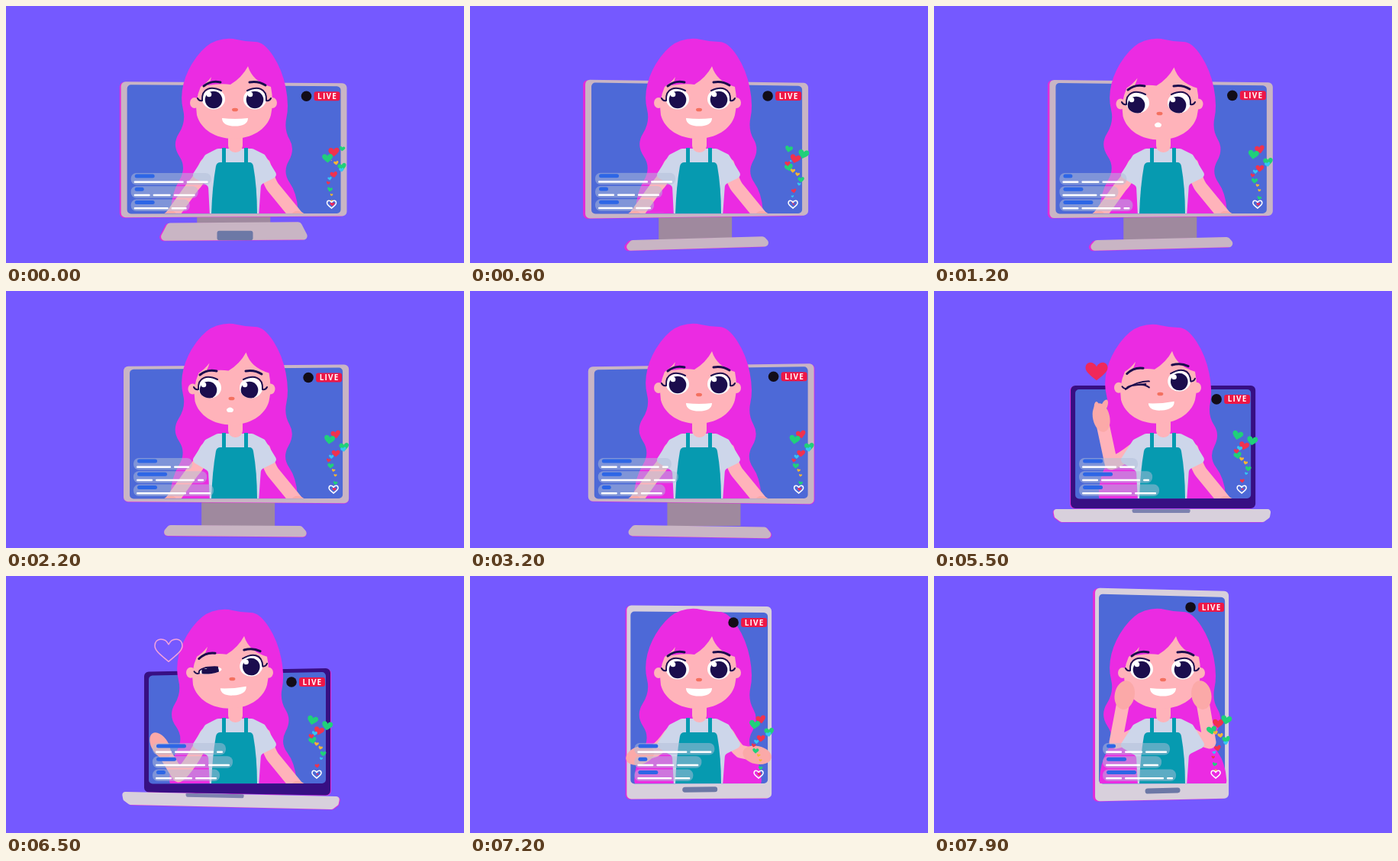
An HTML page with a canvas for the animation above (8 s loop, 600 by 337 pixels).

```html
<!DOCTYPE html>
<html lang="en">
<head>
<meta charset="utf-8">
<title>Live stream</title>
<style>
html, body { margin: 0; width: 100%; height: 100%; overflow: hidden; background: #7559ff; }
canvas { display: block; }
</style>
</head>
<body>
<canvas id="stage" width="600" height="337"></canvas>
<script>
const ctx = document.getElementById('stage').getContext('2d');
const LOOP = 8000, TURN = 3650, FLOOR = 272;
const BG = '#7559ff', SCREEN = '#4d69d7', HAIR = '#eb2be2', SKIN = '#ffb3ba', HAND = '#fba9a8', INK = '#1b0d4d',
  TEAL = '#069ab0', SHIRT = '#cdd6ea', RED = '#f0285a', GREY = '#c9b5c4', PALE = '#d8d0dc', SHADE = '#e22bd8';

const DEVICES = [
  { name: 'monitor', color: GREY, l: 153, r: 447, t: 98, b: 277, side: 8, top: 4 },
  { name: 'laptop', color: '#370f83', l: 179, r: 421, t: 124, b: 285, side: 6, top: 5 },
  { name: 'tablet', color: PALE, l: 213, r: 390, t: 17, b: 294, side: 5, top: 8 }];
const MESSAGES = [
  { width: 105, name: 26, gaps: [69] }, { width: 88, name: 12, gaps: [25, 52] },
  { width: 77, name: 26, gaps: [49] }, { width: 96, name: 39, gaps: [25, 80] }];
const LIKE_COLORS = ['#f0324e', '#20d07a', '#20d07a', '#35c5f4', '#f7b733', '#35c5f4', '#f0324e', '#f7b733'];

const mix = (a, b, k) => a + (b - a) * k;
const clamp = k => Math.max(0, Math.min(1, k));
const ease = k => k * k * (3 - 2 * k);
const ramp = (t, start, time = 350) => ease(clamp((t - start) / time));
const pulse = (t, on, off, time) => ramp(t, on, time) - ramp(t, off, time);
const overshoot = k => 1 + 1.9 * (k - 1) ** 3 + .9 * (k - 1) ** 2;

function fill(color) { ctx.fillStyle = color; ctx.fill(); }
function stroke(color, width) {
  ctx.strokeStyle = color; ctx.lineWidth = width;
  ctx.lineCap = ctx.lineJoin = 'round'; ctx.stroke();
}
function oval(x, y, rx, ry, color, turn = 0) {
  ctx.beginPath(); ctx.ellipse(x, y, rx, ry, turn, 0, 7); fill(color);
}
function box(x, y, w, h, r, color) {
  ctx.beginPath(); ctx.roundRect(x, y, w, h, r); fill(color);
}
function shape(path, color) { ctx.fillStyle = color; ctx.fill(new Path2D(path)); }

// Polygon with rounded corners.
function poly(points, r, color) {
  const n = points.length, last = points[n - 1];
  ctx.beginPath();
  ctx.moveTo((last[0] + points[0][0]) / 2, (last[1] + points[0][1]) / 2);
  points.forEach((p, i) => ctx.arcTo(...p, ...points[(i + 1) % n], r));
  ctx.closePath(); fill(color);
}
// Closed soft curve through the midpoints.
function soft(points, color) {
  const n = points.length;
  ctx.beginPath();
  for (let i = 0; i <= n; i++) {
    const [x, y] = points[i % n], [u, v] = points[(i + 1) % n];
    if (i) ctx.quadraticCurveTo(x, y, (x + u) / 2, (y + v) / 2);
    else ctx.moveTo((x + u) / 2, (y + v) / 2);
  }
  fill(color);
}
function edged(points, r, color, shift) {
  poly(points.map(([x, y]) => [x + shift, y + .5]), r, SHADE);
  poly(points, r, color);
}
function heartPath(x, y, s, turn = 0) {
  ctx.save();
  ctx.translate(x, y); ctx.rotate(turn); ctx.scale(s, s);
  ctx.beginPath();
  ctx.moveTo(0, .85);
  ctx.bezierCurveTo(-.45, .45, -1, .1, -1, -.3);
  ctx.bezierCurveTo(-1, -.9, -.25, -.95, 0, -.4);
  ctx.bezierCurveTo(.25, -.95, 1, -.9, 1, -.3);
  ctx.bezierCurveTo(1, .1, .45, .45, 0, .85);
  ctx.closePath();
  ctx.restore();
}

// The device takes turns, springs from the last one's size and slowly swings round.
function deviceAt(t) {
  const turn = Math.floor((t + 200) / TURN), age = t + 200 - turn * TURN;
  const now = DEVICES[turn % 3], last = DEVICES[(turn + 2) % 3];
  const k = overshoot(clamp(age / 330));
  const yaw = -Math.cos(Math.PI * (age - 950) / 2150);
  const l = mix(last.l, now.l, k) + 2 * yaw, r = mix(last.r, now.r, k) + 4 * yaw;
  const top = mix(last.t, now.t, k), bottom = mix(last.b, now.b, k);
  const d = { ...now, age, yaw, shift: 2 * yaw - 1, l, r,
    tl: top + 1.5 * yaw, tr: top - 3 * yaw, bl: bottom - 1.5 * yaw, br: bottom + 2.5 * yaw };
  return { ...d, left: l + now.side, right: r - now.side, head: d.tr + now.top };
}

function drawStand({ age, yaw, shift }) {
  const up = 1 - ramp(age, 0, 550), c = 299.5 + 1.5 * yaw;
  box(253 + 6 * yaw, 270, 96, 38 - 30 * up, 0, '#9f899e');
  edged([[c - 87, 307 - 32 * up], [c + 87, 306 + 4 * yaw - 30 * up],
    [c + 99, 320 + 5 * yaw - 16 * up], [c - 99, 321 - 19 * up]], 5, GREY, shift);
  const k = Math.min(1, up * 1.4);
  if (k > 0) box(300 - 24 * k, 301 - 6.5 * k, 48 * k, 13 * k, 3, '#6c78a6');
}
function drawKeyboard({ yaw, shift }) {
  const c = 299 - 4.5 * yaw, y = x => 286 + (x - c) * yaw * .022;
  const l = c - 143, r = c + 143, notch = 260 - 25 * yaw;
  edged([[l, y(l)], [r, y(r)], [r - 2, y(r) + 11], [r - 10, y(r) + 17], [l + 10, y(l) + 17], [l + 2, y(l) + 11]], 4, PALE, shift);
  poly([[notch, y(notch)], [notch + 77, y(notch + 77)], [notch + 76, y(notch + 76) + 5], [notch + 1, y(notch) + 5]], 2, '#7d82b0');
}
function drawDevice(d) {
  if (d.name === 'monitor') drawStand(d);
  edged([[d.l, d.tl], [d.r, d.tr], [d.r, d.br], [d.l, d.bl]], 6, d.color, d.shift);
  poly([[d.left, d.tl + d.top], [d.right, d.head], [d.right, FLOOR], [d.left, FLOOR + .5]], 5, SCREEN);
  if (d.name === 'laptop') drawKeyboard(d);
  if (d.name === 'tablet') {
    ctx.save();
    ctx.translate((d.l + d.r) / 2 + 1, (d.bl + d.br) / 2 - 12); ctx.rotate(.03 * d.yaw);
    box(-23, -3.5, 46, 7, 3.5, '#6c78a6');
    ctx.restore();
  }
}

function poseAt(t) {
  const away = pulse(t, 650, 2400), think = pulse(t, 3750, 4700);
  const tilt = pulse(t, 4800, 6600, 450);
  return {
    t, away, tilt, smile: 1 - away - think,
    x: 4 * -tilt - 5 * away - 2 * think, y: 5 * away - tilt,
    open: 1 - .92 * pulse(t, 4750, 6350, 450),
    wave: pulse(t, 3800, 4750), love: pulse(t, 4750, 6150),
    low: pulse(t, 6150, 6650), cheeks: ramp(t, 7050)
  };
}
// Blends arm poses [elbow x, elbow y, hand x, hand y] by weight.
function blend(rest, ...poses) {
  return rest.map((v, i) => poses.reduce((sum, [weight, pose]) => sum + weight * (pose[i] - v), v));
}

function drawHair({ t, tilt }) {
  const sway = Math.sin(t / 600) * 1.5;
  const outline = [[290, 41], [315, 47], [338, 47], [362, 84], [371, 130], [364, 162], [379, 188], [362, 218],
    [381, 245], [384, 290], [215, 290], [217, 245], [237, 212], [217, 182], [236, 152], [228, 120], [237, 84], [262, 50]];
  soft(outline.map(([x, y]) => {
    const low = clamp((y - 150) / 120);
    return [x + mix(-6 * tilt, sway, low), y + tilt * (1 - low)];
  }), HAIR);
}
function drawArm(x, y, [ex, ey, hx, hy]) {
  ctx.beginPath();
  ctx.moveTo(x, y);
  ctx.quadraticCurveTo(mix(x, ex, .6), mix(y, ey, .8), ex, ey);
  ctx.lineTo(hx, hy);
  stroke(SKIN, 17);
}
function drawHand([ex, ey, hx, hy], pose) {
  ctx.save();
  ctx.translate(hx, hy); ctx.rotate(Math.atan2(hy - ey, hx - ex) + Math.PI / 2);
  oval(0, -4, 11 + 2 * pose.cheeks, 19, HAND);
  if (pose.love > .3 && hx < 300) {
    oval(7, -18, 4, 9, HAND, .6);
    oval(-3, -16, 4, 10, HAND, .1);
  }
  ctx.restore();
}
function drawBody() {
  poly([[277, 187], [323, 187], [339, 195], [356, 223], [334, 234], [331, 276], [267, 276], [265, 236], [243, 223], [261, 195]], 5, SHIRT);
  box(291, 162, 19, 30, [0, 0, 9, 9], SKIN);
  box(283, 186, 5, 24, 0, TEAL);
  box(312, 186, 5, 24, 0, TEAL);
  shape('M281 205H319Q323 205 324 210Q329 238 329 274H269Q270 238 275 210Q276 205 281 205Z', TEAL);
}
function drawEye(x, side, open, away) {
  ctx.save();
  ctx.translate(x, -6);
  if (open > .15) {
    ctx.save();
    ctx.beginPath(); ctx.ellipse(0, 0, 15, 13.5 * open, 0, 0, 7); ctx.clip();
    oval(0, 0, 16, 15, '#fff');
    oval(-2 * away, 1 + 2 * away, 11.3, 11.3, INK);
    oval(-6 - 2 * away, -6 + 2 * away, 3.3, 3.3, '#fff');
    ctx.restore();
  }
  ctx.beginPath();
  ctx.moveTo(side * 21, -1);
  ctx.quadraticCurveTo(side * 19, 3, side * 15, 2);
  ctx.bezierCurveTo(side * 16, -15 * open, side * 3, -17 * open, -side * 10, -11 * open);
  stroke(INK, 2);
  if (open < .2) {
    ctx.beginPath();
    ctx.moveTo(-17, 3); ctx.quadraticCurveTo(0, -6, 15, -4);
    ctx.moveTo(0, -1); ctx.quadraticCurveTo(8, -1, 14, 4);
    stroke(INK, 2);
  }
  ctx.restore();
}
function drawMouth(smile) {
  const w = mix(4.5, 17, smile), top = -3 * smile, low = mix(4, 7.5, smile);
  ctx.beginPath();
  ctx.moveTo(-w, top);
  ctx.quadraticCurveTo(0, mix(-5, -1, smile), w, top);
  ctx.bezierCurveTo(w, 4 + smile, w * .55, low, 0, low);
  ctx.bezierCurveTo(-w * .55, low, -w, 4 + smile, -w, top);
  fill('#fff');
}
function drawHead({ x, y, tilt, smile, open, away }) {
  ctx.save();
  ctx.translate(x * .5 - 3 * tilt, y * .3);
  oval(247, 127, 6, 7, SKIN);
  oval(349, 127, 6, 7, SKIN);
  shape('M317 79Q323 99 347 106Q351 126 347 143C342 162 321 174 298 174C275 174 255 162 250 143Q247 124 255 106Q263 101 269 93Q267 101 264 104Q282 101 294 103Q309 94 317 79Z', SKIN);
  ctx.restore();

  ctx.save();
  ctx.translate(299 + x, 128 + y); ctx.rotate(-.11 * tilt);
  drawEye(-27, -1, open, away);
  drawEye(27, 1, 1, away);
  ctx.beginPath();
  ctx.moveTo(-40, -23); ctx.quadraticCurveTo(-30, -31, -18, -28);
  ctx.moveTo(20, -28); ctx.quadraticCurveTo(32, -30, 41, -24);
  stroke(INK, 3);
  ctx.restore();

  oval(300 + x * .9, 136 + y, 4, 2.3, '#f4705f');
  ctx.save();
  ctx.translate(mix(296, 300, smile) + x * .5, 150 + y); ctx.rotate(-.08 * tilt);
  drawMouth(smile);
  ctx.restore();
}
function drawPerson(pose) {
  const left = blend([245, 236, 212, 282], [pose.wave, [236, 220, 240, 163]], [pose.love, [232, 226, 220, 170]],
    [pose.low, [226, 262, 204, 226]], [pose.cheeks, [238, 218, 249, 160]]);
  const right = blend([350, 238, 386, 282], [pose.cheeks, [361, 218, 351, 160]]);
  ctx.save();
  ctx.beginPath(); ctx.rect(0, 0, 600, FLOOR); ctx.clip();
  drawHair(pose);
  drawArm(262, 208, left);
  drawArm(338, 208, right);
  drawBody();
  drawHead(pose);
  drawHand(left, pose);
  drawHand(right, pose);
  ctx.restore();
}

function drawChat(t, x, y) {
  const beat = (t - 4080) / 875 + 9;
  const first = Math.floor(beat) - 1 + ramp(beat % 1, 0, .33);
  ctx.save();
  ctx.beginPath(); ctx.rect(0, y - .5, 600, 52.5); ctx.clip();
  for (let i = Math.floor(first); i < first + 3; i++) {
    const { width, name, gaps } = MESSAGES[i % 4];
    const top = y + (i - first) * 17.3;
    box(x, top, width, 15.5, 7, 'rgba(178,192,218,.5)');
    box(x + 5, top + 1.5, name, 5, 2.5, '#2d66e6');
    let from = 4;
    for (const to of [...gaps, width - 4]) {
      box(x + from, top + 10.5, to - from, 2.4, 1, '#fff');
      from = to + 4;
    }
  }
  ctx.restore();
}
function drawBadge(x, y) {
  oval(x - 10, y + 6, 6.8, 6.8, '#120c18');
  box(x, y, 34, 12, 3, '#ee1746');
  ctx.font = '700 10px "Open Sans", sans-serif';
  ctx.letterSpacing = '1.2px';
  ctx.textAlign = 'center';
  ctx.fillStyle = '#fff';
  ctx.fillText('LIVE', x + 17.5, y + 9.6);
}
function drawLikes(t, x, y) {
  const phase = t / 1000 % 1;
  LIKE_COLORS.forEach((color, i) => {
    const big = i < 3, life = big ? 2 : 1.2, dx = 3 + 11 * Math.sin(i * 4);
    for (let age = (.65 + .63 * i + phase) % 1; age < life; age++) {
      const rise = 90 * (1 - Math.exp(-age / 1.15));
      const size = (big ? 7 : 4.3) * Math.min(1, .35 + age * .5) * Math.min(1, (life - age) * 6);
      heartPath(x + dx * Math.min(1, age * 1.5), y - rise, size, Math.sin(age * 4 + dx) * .25);
      fill(color);
    }
  });
  heartPath(x, y, 6);
  stroke('#fff', 1.5);
  heartPath(x + 1, y, 3 * (1 - phase));
  fill(RED);
}
function drawLove(t) {
  if (t < 5100 || t > 6800) return;
  const k = ramp(t, 5100, 400);
  if (t < 6200) {
    heartPath(mix(222, 213, k), mix(148, 105, k) - Math.max(0, t - 5500) / 85, 14.5 * k);
    fill(RED);
  } else {
    ctx.globalAlpha = clamp((6800 - t) / 250);
    heartPath(213, 97, 15 + 3 * ramp(t, 6200, 300));
    stroke('#f5a3dc', 1.5);
    ctx.globalAlpha = 1;
  }
}

function frame(now) {
  const t = Math.floor(now % LOOP / 100) * 100;
  const device = deviceAt(t);
  ctx.fillStyle = BG;
  ctx.fillRect(0, 0, 600, 337);
  drawDevice(device);
  drawPerson(poseAt(t));
  drawChat(t, device.left + 5, 219);
  drawBadge(device.right - 35, device.head + 7);
  drawLikes(t, device.right - 12, 260);
  drawLove(t);
  requestAnimationFrame(frame);
}
requestAnimationFrame(() => frame(performance.now()));
</script>
</body>
</html>
```
